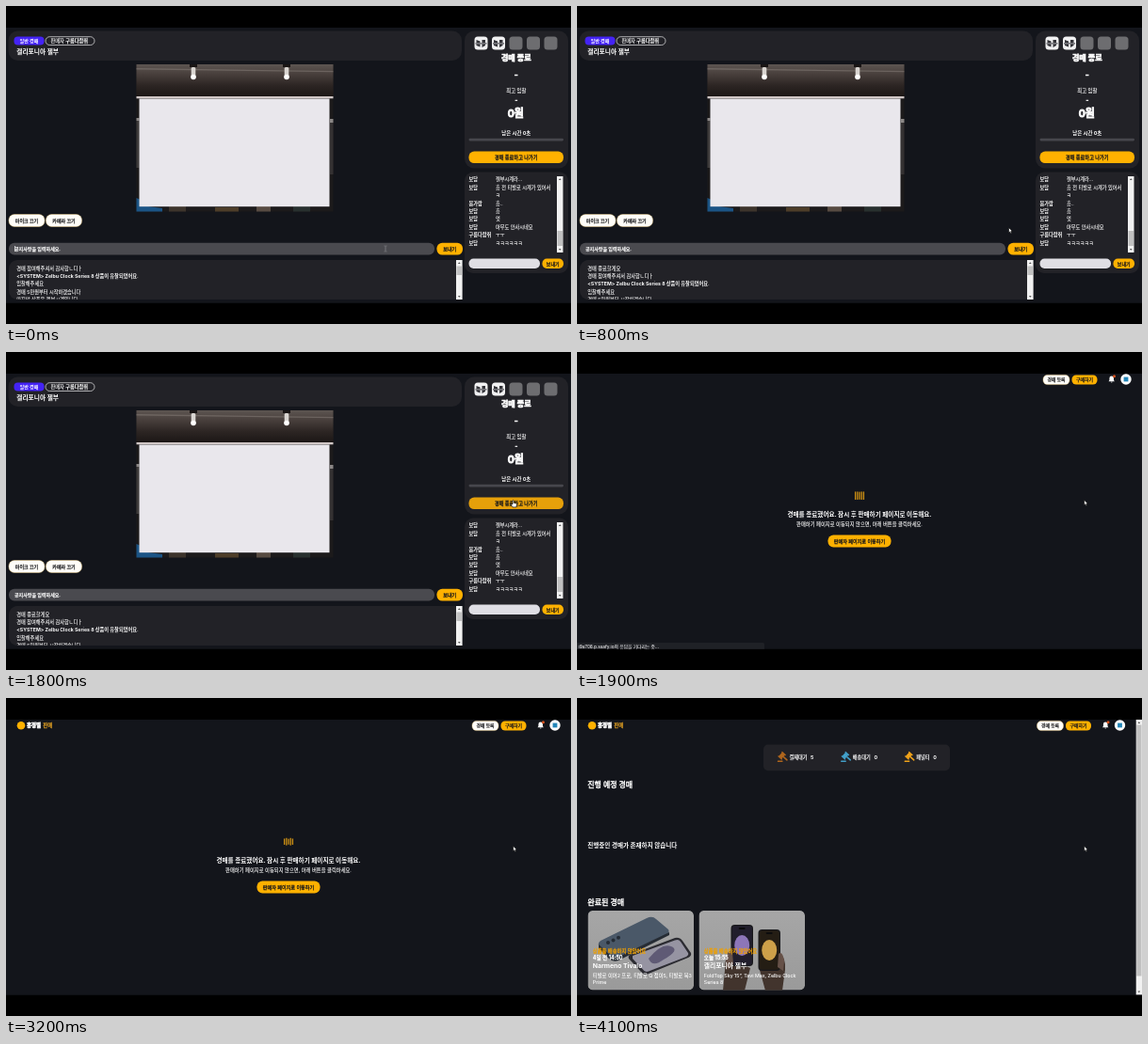
An HTML page for the animation above (4.2 s loop, 600 px wide and 338 px high).

```html
<!DOCTYPE html>
<html lang="ko">
<head>
<meta charset="utf-8">
<style>
html, body { margin: 0; width: 100%; height: 100%; overflow: hidden; background: #000; }
svg { display: block; width: 600px; height: 338px; }
text { font-family: Inter, "Noto Sans CJK KR", "Noto Sans CJK", sans-serif; white-space: pre; }
</style>
</head>
<body>
<svg id="stage" viewBox="0 0 600 338" xmlns="http://www.w3.org/2000/svg"></svg>
<script>
const LOOP = 4200, LEAVE = 1900, LIST = 3900, SPIN = 1850;
const AMBER = '#ffb100', PANEL = '#222227', BG = '#13151b', WHITE = '#fff', DARK = '#15161a';

// x, vertical centre, size; a thin stroke stands in for the medium weights
const text = (s, x, y, size, weight = 400, fill = WHITE, anchor = 'start') => {
  const stroke = weight >= 700 ? 0 : size * (weight - 350) / 3000;
  return `<text x="${x}" y="${y + size * 0.36}" font-size="${size}" font-weight="${weight}" fill="${fill}" ` +
    `stroke="${fill}" stroke-width="${stroke}" text-anchor="${anchor}">${s}</text>`;
};
const mid = (s, x, y, size, weight, fill) => text(s, x, y, size, weight, fill, 'middle');
const box = (x, y, w, h, r, fill, more = '') =>
  `<rect x="${x}" y="${y}" width="${w}" height="${h}" rx="${r}" fill="${fill}" ${more}/>`;
const path = (d, fill, more = '') => `<path d="${d}" fill="${fill}" ${more}/>`;
const dot = (x, y, r, fill) => `<circle cx="${x}" cy="${y}" r="${r}" fill="${fill}"/>`;
const group = (body, more = '') => `<g ${more}>${body}</g>`;
const pill = (x, y, w, h, fill, label, size, ink = DARK, weight = 500, more = '') =>
  box(x, y, w, h, h * .45, fill, more) + mid(label, x + w / 2, y + h / 2, size, weight, ink);

const scrollbar = (x, y, w, h, ty, th) => {
  const c = x + w / 2, e = y + h;
  return box(x, y, w, h, 0, '#f1f1f1') + box(x + .5, ty, w - 1, th, 0, '#c1c1c1') +
    path(`M${c - 1.4} ${y + 4}h2.8l-1.4-1.8zM${c - 1.4} ${e - 4}h2.8l-1.4 1.8z`, '#555');
};

const camera = () => {
  const lamp = x => box(x - 4, 62, 8, 3, 0, '#191514') + box(x - 2.3, 65, 4.6, 12, 1.5, '#d9d5d1') +
    dot(x, 75.5, 2.8, WHITE);
  return box(138.5, 62, 209, 156.5, 0, '#1c1a1b') +
    box(138.5, 62, 209, 34, 0, 'url(#ceiling)') +
    path('M138.5 66L347.5 69V70.3L138.5 67.6Z', '#8a827d', 'opacity=".5"') +
    box(138.5, 96, 209, 2.3, 0, '#cfc6c5') +
    lamp(199) + lamp(298) +
    box(138.5, 119, 3, 3, 0, '#8b8786') + box(138.5, 122, 3, 50, 0, '#3f3c3c') +
    box(344, 120, 3.5, 4, 0, '#8b8786') + box(344, 124, 3.5, 55, 0, '#343132') +
    path('M138.5 204L143 206L151 213L166 215V218.5H138.5Z', '#1b5485') +
    box(173, 213, 18, 5.5, 0, '#3d342c') + box(222, 214, 25, 4.5, 0, '#4d3d29') +
    box(266, 213, 15, 5.5, 0, '#574b42') + box(305, 213, 18, 5.5, 0, '#28302f') +
    box(141.5, 98.5, 202, 114.7, 0, '#e9e7ec');
};

const thumb = x => box(x, 32.5, 14, 14, 3.5, '#f1f1f2') +
  path(`M${x + 2} 36l4 1.5v6l-4-1.5zM${x + 8} 36h3.5v6l-3.5 2z`, '#333338') +
  box(x + 1, 39, 12, 1.6, 0, '#77777c');

const chat = [
  ['보담', '젤부시계라...'], ['보담', '흠 전 티발로 시계가 있어서'], ['', 'ㅋ'],
  ['봄가람', '흠..'], ['보담', '흠'], ['보담', '엇'], ['보담', '아무도 안사시네요'],
  ['구름다람쥐', 'ㅜㅜ'], ['보담', 'ㅋㅋㅋㅋㅋㅋ']
];
const notices = [
  '경매 종료할게요', '경매 참여해주셔서 감사합ㄴ디ㅏ',
  '&lt;SYSTEM&gt; Zelbu Clock Series 8 상품이 유찰되었어요.',
  '입찰해주세요', '경매 5만원부터 시작하겠습니다', '마지막 상품은 젤부시계입니다'
];
const notice = (s, i) => text(s, 11.3, 279.2 + i * 8.2, 5.2, s.includes('SYSTEM') ? 700 : 400);

const auction = () =>
  box(2.5, 26.5, 481.5, 31.5, 10, PANEL) +
  pill(8.5, 32.5, 32, 9, '#4423f5', '일반 경매', 5.1, WHITE, 700) +
  box(42, 32.7, 52, 8.8, 4.4, 'none', 'stroke="#e8e8ea" stroke-width=".7"') +
  text('판매자 <tspan font-weight="700">구름다람쥐</tspan>', 47.5, 37, 5.2) +
  text('캘리포니아 젤부', 11.3, 49, 6.7, 700) +
  camera() +
  pill(3, 221.5, 38, 13, '#fffdf8', '마이크 끄기', 5, DARK, 500, 'stroke="#ffd98a" stroke-width=".4"') +
  pill(42.5, 221.5, 38, 13, '#fffdf8', '카메라 끄기', 5, DARK, 500, 'stroke="#ffd98a" stroke-width=".4"') +
  box(3, 251.8, 452, 12.6, 6, '#4a4a4f') +
  text('공지사항을 입력하세요.', 9, 258, 5, 500) +
  box(9, 255, .7, 6, 0, WHITE, 'id="caret"') +
  pill(457.5, 251.8, 27.5, 12.8, AMBER, '보내기', 5.1) +
  box(3, 270, 482, 42, 9, PANEL) +
  group(group(notices.map(notice).join(''), 'id="newList"') +
    group(notices.slice(1).map(notice).join(''), 'id="oldList"'), 'clip-path="url(#noticeClip)"') +
  scrollbar(478, 270, 6.6, 42, 276.5, 9.5) +

  box(487, 26.5, 110, 146, 10, PANEL) +
  thumb(497.5) + thumb(516) +
  [534.5, 553, 571.5].map(x => box(x, 32.5, 14, 14, 3.5, '#6d6d70')).join('') +
  mid('경매 종료', 541.8, 55.5, 8.1, 600) +
  mid('-', 541.8, 73, 8.5, 600) +
  mid('최고 입찰', 541.8, 90.5, 5.3) +
  mid('-', 541.8, 99.5, 6, 600) +
  mid('0원', 541.2, 114.5, 10.8, 600) +
  mid('남은 시간 0초', 541.8, 135, 5.4, 700) +
  box(491.5, 140.8, 100.5, 2.6, 1.3, '#47474d') +
  pill(491.5, 154.5, 100.5, 12.6, AMBER, '경매 종료하고 나가기', 5.2, DARK, 500, 'id="leave"') +

  box(487, 176.5, 110, 107.5, 9, PANEL) +
  chat.map(([who, s], i) => text(who, 491.5, 184.5 + i * 8.42, 5.2, 700) +
    text(s, 520, 184.5 + i * 8.42, 5.2)).join('') +
  scrollbar(585, 181, 6.5, 81, 239, 16) +
  box(491.5, 268.5, 75.5, 10.5, 5, '#dfdee4') +
  pill(569.5, 268.5, 22.5, 10.5, AMBER, '보내기', 5);

const header = () =>
  pill(495, 24.4, 28, 10.2, '#fffdf8', '경매 등록', 4.8, DARK, 500, 'stroke="#ffd98a" stroke-width=".4"') +
  pill(525.5, 24.4, 27, 10.2, AMBER, '구매하기', 4.9) +
  path('M564.5 31.2L565.4 29.9V28A2.3 2.4 0 0 1 570 28V29.9L570.9 31.2ZM566.8 31.7H568.7A1 1 0 0 1 566.8 31.7Z', WHITE) +
  dot(570.5, 25.8, 1.5, '#d9531e') +
  dot(583, 29, 5.7, WHITE) + box(580.6, 26.6, 4.8, 4.8, 0, '#2386b8');

const brand = () => dot(16, 29.3, 4.3, AMBER) +
  text('흥정별', 22, 29.3, 5.5, 600) + text('판매', 39.3, 29.3, 5.5, 500, '#d99a22');

const leaving = () =>
  group(header()) + group(brand(), 'id="brand"') +
  [0, 1, 2, 3, 4].map(i => box(295 + i * 2.2, 148, 1.25, 9, 0, '#d49413', 'class="bar"')).join('') +
  mid('경매를 종료했어요. 잠시 후 판매하기 페이지로 이동해요.', 300, 173, 6.6, 700) +
  mid('판매하기 페이지로 이동되지 않으면, 아래 버튼을 클릭하세요.', 300, 183, 5.3) +
  pill(266.5, 194.5, 67, 13, AMBER, '판매자 페이지로 이동하기', 5.1) +
  group(box(-2, 309, 201, 8, 1.5, '#1f2126') +
    text('i9a706.p.ssafy.io의 응답을 기다리는 중...', 1.5, 313, 4.75, 400, '#e6e6e8'), 'id="status"');

const gavel = (x, c) => group(
  group(box(-2.2, -4.2, 4.4, 5.6, 0, c) + box(-3, -5.2, 6, 1.4, .5, c) +
    box(-3, 1, 6, 1.4, .5, c) + box(2, -2.3, 6.2, 1.6, .7, c), 'transform="translate(-.4 -.6) rotate(42)"') +
  box(-4.5, 4, 6, 1.4, .4, c), `transform="translate(${x} 62.8) scale(.95)"`);

const stat = (x, label, n, nx, c) =>
  gavel(x - 8.4, c) + text(label, x, 63, 5.2, 700) + text(n, nx, 63, 5.4, 700);

const card = (x, id, art, when, title, lines) => group(
  box(x, 226, 112.5, 84.5, 5, 'url(#cardBg)') + art, `clip-path="url(#${id})"`) +
  text('상품을 배송하지 않았어요', x + 5.3, 268.6, 5.3, 500, '#f0a000') +
  text(when, x + 5.3, 275.6, 5.6, 500) +
  text(title, x + 5.3, 285, 6.8, 700) +
  lines.map((s, i) => text(s, x + 5.3, 295 + i * 6.6, 5.3)).join('');

const slabs = () =>
  path('M25 258L74 234Q80 231 84 235L97 246Q99 250 94 252L44 275Q38 277 34 272L23 263Q22 260 25 258Z', '#4a5868') +
  path('M23 262L34 272Q38 277 44 275L98 249V252L44 279Q38 281 34 277L23 266Z', '#262c34') +
  dot(33, 260, 2, '#252c35') + dot(38.5, 257.4, 2, '#252c35') + dot(44, 254.8, 2, '#252c35') +
  path('M56 273L104 255Q109 254 112 258L121 271Q122 274 118 276L76 293Q71 295 68 291L55 277Q54 274 56 273Z', '#2b2b31') +
  path('M59 274L104 257.5Q108 256 110 259L118 271Q119 273 116 275L76 290.5Q72 292 70 288.5L59 277Z', '#9694a2') +
  path('M76 277Q90 260 100 264T92 278Q80 287 76 277Z', '#5f5a75');

const hands = () => {
  const phone = (x, y, c, glow) => box(x, y, 23.5, 44, 4, '#19191c') +
    box(x + 1.2, y + 1.2, 21.1, 41.6, 3, c) +
    `<ellipse cx="${x + 11.7}" cy="${y + 22}" rx="8" ry="11" fill="${glow}"/>` +
    box(x + 8.2, y + 3, 7, 2, 1, '#0c0c0e');
  return path('M155 311L157 289Q156 275 164 270L172 282L184 287L178 311Z', '#42342d') +
    path('M218 311L221 289Q222 276 215 271L206 284L194 289L200 311Z', '#42342d') +
    phone(163.5, 241, '#211e2c', '#8d76b8') + phone(192.5, 246, '#241d14', '#cda049') +
    path('M158 278Q160 266 165 270L166 283L160 289Z', '#665148') +
    path('M220 279Q218 268 214 272L213 286L219 290Z', '#665148');
};

const sales = () =>
  group(header(), 'transform="translate(-6.5 0)"') + brand() +
  box(198, 49.5, 198, 27.7, 5, PANEL) +
  stat(225.5, '결제대기', '5', 248, '#b0661c') +
  stat(292.8, '배송대기', '0', 315.5, '#42a0ca') +
  stat(360.3, '패널티', '0', 378.2, '#f0a31a') +
  text('진행 예정 경매', 11.3, 91.8, 7.9, 500) +
  text('진행중인 경매가 존재하지 않습니다', 11.3, 157, 6.55, 700) +
  text('완료된 경매', 11.3, 217, 8, 500) +
  card(11.5, 'card1', slabs(), '4일 전 14:50', 'Narmeno Tivalo',
    ['티발로 이어2 프로, 티발로 Q 접이5, 티발로 북3', 'Prime']) +
  card(129.5, 'card2', hands(), '오늘 15:55', '캘리포니아 젤부',
    ['FoldTop Sky 15”, Tavi Max, Zelbu Clock', 'Series 8']) +
  scrollbar(593.7, 23, 6.3, 292.5, 28.5, 267);

const outline = 'stroke="#000" stroke-width=".6" stroke-linejoin="round"';
const cursors =
  path('M-1.4-3H-.4M.4-3H1.4M0-2.8V2.8M-1.4 3H-.4M.4 3H1.4', 'none', 'id="beam" stroke="#a4a4a8" stroke-width=".5"') +
  path('M0 0V5.5L1.3 4.4L2.1 6.2L3 5.8L2.2 4H3.9Z', WHITE, `id="arrow" ${outline}`) +
  path('M-.6 .6Q0-.4 .6 .6V3L3.2 3.6Q4 4 3.8 5L3.2 7.6H-.6L-2.2 5Q-2.4 4 -.6 4.6Z', WHITE, `id="hand" ${outline}`);

const clip = (id, x, y, w, h, r) => `<clipPath id="${id}">${box(x, y, w, h, r, WHITE)}</clipPath>`;
const fade = (id, ...colors) => `<linearGradient id="${id}" x2="0" y2="1">` + colors.map((c, i) =>
  `<stop offset="${i / (colors.length - 1)}" stop-color="${c}"/>`).join('') + '</linearGradient>';

document.getElementById('stage').innerHTML = '<defs>' +
  clip('view', 0, 23, 600, 292.7, 0) + clip('noticeClip', 3, 270, 474, 41.6, 0) +
  clip('card1', 11.5, 226, 112.5, 84.5, 5) + clip('card2', 129.5, 226, 112.5, 84.5, 5) +
  fade('ceiling', '#5d5551', '#463d3a', '#2c2523', '#1c1716') + fade('cardBg', '#a6a6a6', '#9a9a9a') +
  '</defs>' + box(0, 0, 600, 338, 0, '#000') +
  group(box(0, 23, 600, 293, 0, BG) + group(auction(), 'id="auction"') +
    group(leaving(), 'id="leaving"') + group(sales(), 'id="sales"') +
    group(cursors, 'id="cursor"'), 'clip-path="url(#view)"');

const el = id => document.getElementById(id);
const bars = [...document.querySelectorAll('.bar')];
const show = (id, on) => { el(id).style.display = on ? '' : 'none'; };

// time, x, y
const route = [[0, 403, 258], [300, 403, 258], [800, 458.5, 235.5], [1300, 537, 162], [1700, 538.6, 157.3]];
const pointer = t => {
  const i = route.findIndex(p => p[0] > t);
  if (i < 0) return route[route.length - 1].slice(1);
  const a = route[i - 1], b = route[i], k = (t - a[0]) / (b[0] - a[0]), e = k * k * (3 - 2 * k);
  return [a[1] + (b[1] - a[1]) * e, a[2] + (b[2] - a[2]) * e];
};

const barHeight = p => p < .8 ? 120 - 100 * p : p < .9 ? 40 + 1000 * (p - .8) : 140 - 200 * (p - .9);

function draw(t) {
  const first = t < LEAVE, last = t >= LIST;
  show('auction', first);
  show('leaving', !first && !last);
  show('sales', last);
  show('brand', t >= 2200);
  show('status', t < 2300);
  show('caret', t % 1000 < 500);
  show('oldList', t < 100);
  show('newList', t >= 100);

  const [x, y] = pointer(t);
  const beam = first && y > 251 && x < 455;
  const over = first && x > 491.5 && y > 154 && y < 167;
  el('cursor').setAttribute('transform', `translate(${x} ${y})`);
  show('beam', beam);
  show('hand', over);
  show('arrow', !beam && !over);
  el('leave').setAttribute('fill', over ? '#e6a00a' : AMBER);

  bars.forEach((bar, i) => {
    const s = (t - SPIN) / 1000 - Math.abs(i - 2) * .25;
    const h = (s < 0 ? 120 : barHeight(s % 1)) / 14;
    bar.setAttribute('height', h);
    bar.setAttribute('y', 152.7 - h / 2);
  });
}

const start = performance.now();
function tick() {
  draw((performance.now() - start) % LOOP);
  requestAnimationFrame(tick);
}
tick();
</script>
</body>
</html>
```
